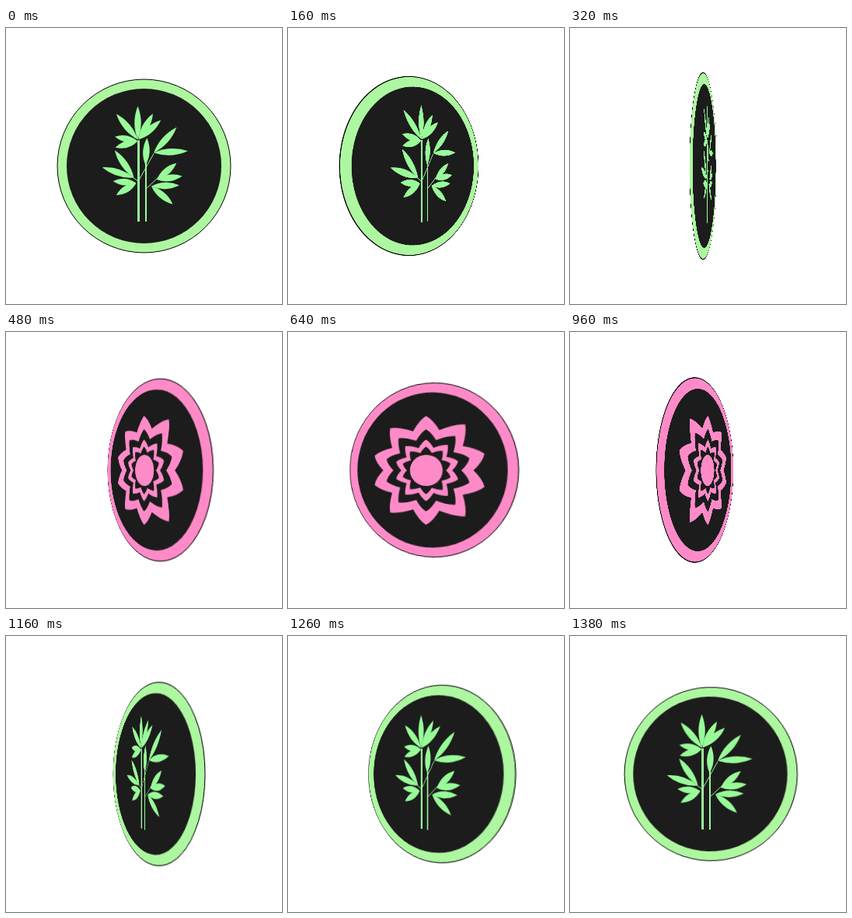
These frames come from a looping animation (355 by 355 pixels, 1.4 s). An HTML page:

```html
<!DOCTYPE html>
<html lang="en">
<head>
<meta charset="utf-8">
<title>Spinning coin</title>
<style>
  html, body { margin: 0; width: 100%; height: 100%; overflow: hidden; background: #fff; }
  main { position: absolute; inset: 0; overflow: hidden; }
  svg { position: absolute; left: 0; top: 0; width: 355px; height: 355px; backface-visibility: hidden; }
</style>
</head>
<body>
<main></main>
<script>
const LOOP = 1400, STEP = 20;
const DARK = "#1c1c1c", PINK = "#ff8ac8", LEAF = "#98fb98", RIM = "#adf7a0";

const coin = (rim, emblem) => `<svg viewBox="-177.5 -177.5 355 355">
  <circle r="111.5" fill="${rim}" stroke="#000"/>
  <circle r="99.5" fill="${DARK}"/>${emblem}</svg>`;

// A pointed leaf growing up from the origin
const leaf = (length, angle) =>
  `<path d="M0 0Q8.5 ${-length / 2} 0 ${-length}Q-8.5 ${-length / 2} 0 0" transform="rotate(${angle})"/>`;

const spray = (x, y, length, ...angles) =>
  `<g transform="translate(${x} ${y})">${angles.map(a => leaf(length, a)).join("")}</g>`;

function bamboo() {
  const leaves = [
    spray(-8, -34, 43, 0, -40), spray(-8, -32, 30, -79, -106), spray(-7, -34, 38, 29, 49),
    spray(2, -1, 35, 3), spray(12.5, -17, 44, 42, 87),
    spray(-13, 15, 43, -35, -72), spray(-10, 22, 30, -85, -121),
    spray(16.5, 17.5, 33, 50, 82), spray(9.5, 26, 36, 88, 130)
  ];
  return `<g fill="${LEAF}">${leaves.join("")}</g><g fill="none" stroke="${LEAF}">
    <path d="M-7-33V71.5" stroke-width="3"/><path d="M2.5-4V71.5" stroke-width="2"/>
    <path d="M-7 19L12.5-16M2 30L18 15M-15 14L-7 20"/></g>`;
}

// Tips and notches of one quadrant, mirrored into a closed ten-petal outline
function petalOutline() {
  const quarter = [[0, -70], [17.5, -51], [50, -56.5], [47, -30], [73, -20], [60, 0]];
  const flip = (points, sx, sy) => points.map(([x, y]) => [x * sx, y * sy]);
  const half = [...quarter, ...flip(quarter.slice(0, -1).reverse(), 1, -1)];
  const points = [...half, ...flip(half.slice(1, -1).reverse(), -1, 1)];
  const bulge = 1.07 / 2;
  return "M0-70" + points.map(([x, y], i) => {
    const [nx, ny] = points[(i + 1) % points.length];
    return `Q${(x + nx) * bulge} ${(y + ny) * bulge} ${nx} ${ny}`;
  }).join("") + "Z";
}

function flower() {
  const outline = petalOutline();
  const rings = [1, .755, .565, .435].map((scale, i) =>
    `<path d="${outline}" transform="scale(${scale})" fill="${i % 2 ? DARK : PINK}"/>`);
  return `<g transform="translate(0 .5)">${rings.join("")}<ellipse rx="21.8" ry="20" fill="${PINK}"/></g>`;
}

const stage = document.querySelector("main");
stage.innerHTML = coin(RIM, bamboo()) + coin(PINK, flower());
const [front, back] = stage.children;

function draw() {
  const time = Math.floor(performance.now() % LOOP / STEP) * STEP;
  const angle = 360 * time / LOOP;
  const turn = a => `perspective(300px) rotateY(${a}deg)`;
  front.style.transform = turn(angle);
  back.style.transform = turn(angle + 180);
  requestAnimationFrame(draw);
}
draw();
</script>
</body>
</html>
```
